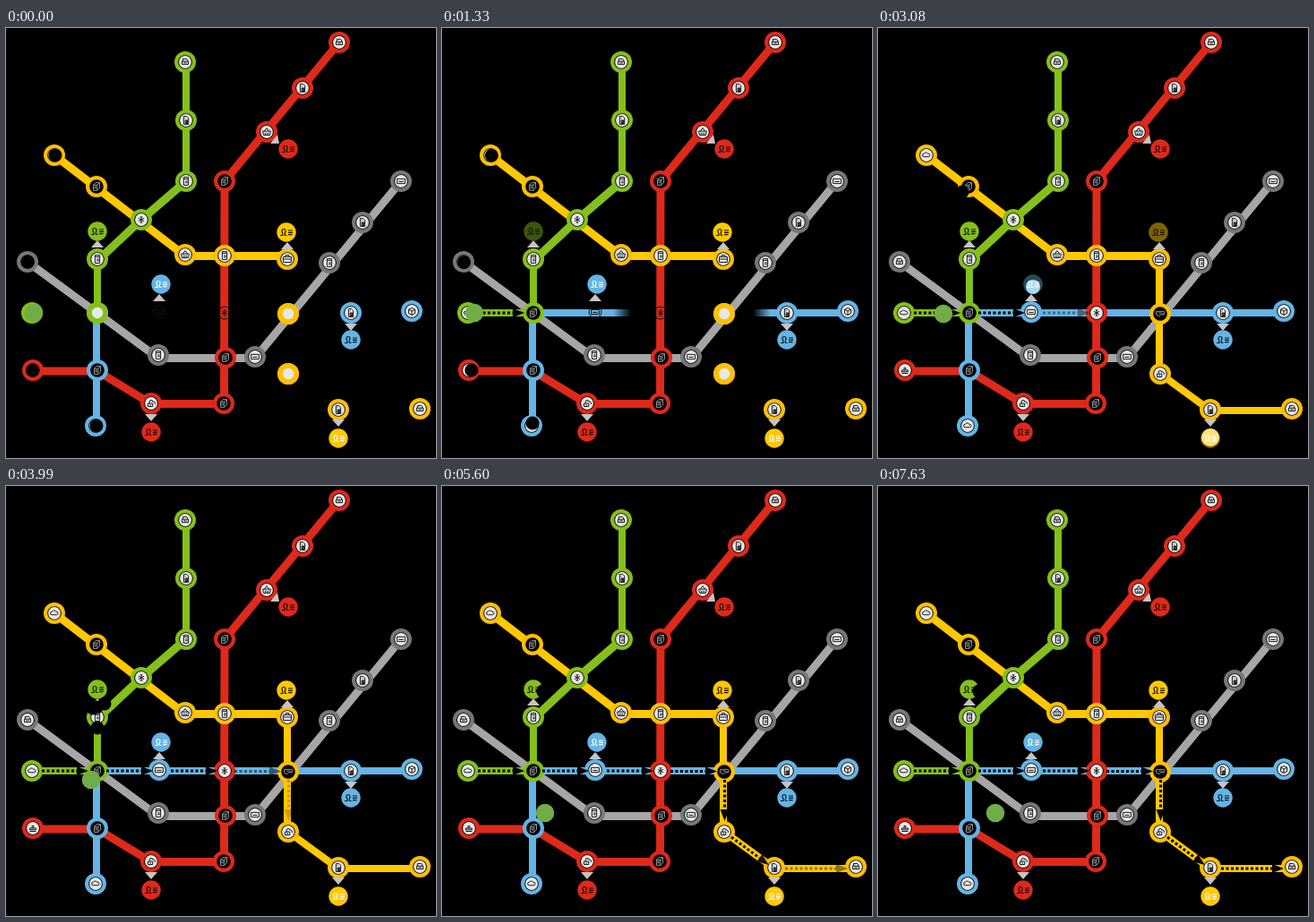
An HTML page that plays this animation: 480 px wide and 480 px high, repeating every 7770 ms.

```html
<!DOCTYPE html>
<html lang="en">
<head>
<meta charset="utf-8">
<title>Network map</title>
<style>
  html, body { margin: 0; width: 100%; height: 100%; overflow: hidden; background: #000; }
  svg { display: block; width: 100vw; height: 100vh; }
</style>
</head>
<body>
<svg id="stage" viewBox="0 0 480 480"></svg>
<script>
const LOOP = 7770, STEP = 70, LAST = 7630;
const GREEN = '#84bf1b', YELLOW = '#ffc800', AMBER = '#ffc000', RED = '#de291b',
      BLUE = '#64b4e6', GREY = '#a6a6a6', STEEL = '#75777a', LIGHT = '#e8e8e8', INK = '#111';

const ICONS = {
  print: 'M-4-1h8v4h-8zM-3-1v-3h5l1 1v2M-2 1h4',
  doc: 'M-3-5h4l2 2v8h-6zM-1 0h3v4h-3zM0 0v4M1 0v4M-1-3v1',
  server: 'M-3-5h6v10h-6zM-3-3h6M-1 0h3M-1 2h3',
  flake: 'M0-4V4M-3.5-2L3.5 2M-3.5 2L3.5-2M-1.5-4L0-3L1.5-4M-1.5 4L0 3L1.5 4',
  basket: 'M-5-1h10l-1 5h-8zM-3-1l3-4 3 4M-2 1v2M0 1v2M2 1v2',
  case: 'M-5-3h10v7h-10zM-2-3v-2h4v2M-5 0h10',
  card: 'M-5-3h10v6h-10zM-3 0.5h6',
  lock: 'M-4 0h6v4h-6zM-2 0v-2a2 2 0 0 1 4 0M2-3l3 2v2M-1 1v2',
  cloud: 'M-3 2a2 2 0 0 1 0-4a3 3 0 0 1 5 0a2 2 0 0 1 1 4z',
  box: 'M-4-2l4-2 4 2v5l-4 2-4-2zM-4-2l4 2 4-2M0 0v5',
  stamp: 'M-4 4h8M-4 2h8v-2h-8zM-1 0v-3h2v3',
  hand: 'M-5-3h10v4h-4l-2 2-4-2zM-2-1h4l2 2',
  stack: 'M-4-2h5v7h-5zM-4-2l3-3h5l-3 3M4-5v7l-3 3M-3 0h3M-3 2h3'
};
const PERSON = 'M-7 3.5h3c1-1-1-3-1-5a2 2 0 0 1 4 0c0 2-2 4 0 5h1.5M2-2h5M2 0.3h5M2 2.6h4.5';

const stage = document.getElementById('stage');
const updates = [];
const clamp = v => Math.max(0, Math.min(1, v));
const progress = (t, start, end) => clamp((t - start) / (end - start));

function add(tag, attrs = {}, parent = stage) {
  const el = document.createElementNS('http://www.w3.org/2000/svg', tag);
  for (const key in attrs) el.setAttribute(key, attrs[key]);
  parent.append(el);
  return el;
}
const group = (x = 0, y = 0, parent = stage) => add('g', { transform: `translate(${x} ${y})` }, parent);
const disc = (r, fill, parent) => add('circle', { r, fill }, parent);
const draw = (d, stroke, width, parent) =>
  add('path', { d, stroke, 'stroke-width': width, fill: 'none', 'stroke-linejoin': 'round' }, parent);
const icon = (name, color, parent) =>
  draw(ICONS[name], color, 1.1, parent).setAttribute('transform', 'scale(0.88)');

function fade(el, start, end, from = 0, to = 1) {
  updates.push(t => el.setAttribute('opacity', from + (to - from) * progress(t, start, end)));
}

// A line revealed from its first end with a soft edge.
function wipe(color, x1, y1, x2, y2, start, end) {
  const id = 'wipe' + updates.length, soft = 0.14;
  const gradient = add('linearGradient', { id, gradientUnits: 'userSpaceOnUse' });
  add('stop', { offset: 0, 'stop-color': color }, gradient);
  add('stop', { offset: 1, 'stop-color': color, 'stop-opacity': 0 }, gradient);
  const line = draw(`M${x1} ${y1}L${x2} ${y2}`, `url(#${id})`, 8);
  updates.push(t => {
    const p = progress(t, start, end), front = p * (1 + soft), back = front - soft;
    gradient.setAttribute('x1', x1 + (x2 - x1) * back);
    gradient.setAttribute('y1', y1 + (y2 - y1) * back);
    gradient.setAttribute('x2', x1 + (x2 - x1) * front);
    gradient.setAttribute('y2', y1 + (y2 - y1) * front);
    line.setAttribute('visibility', p ? 'visible' : 'hidden');
  });
}

function arrow(x, y, length, angle, start, end) {
  const g = add('g', { transform: `translate(${x} ${y}) rotate(${angle})` });
  const shaft = draw(`M0 0H${length - 13}`, '#000', 3, g);
  shaft.setAttribute('stroke-dasharray', '3 2.5');
  add('path', { d: `M${length - 13}-5L${length} 0L${length - 13} 5z` }, g);
  fade(g, start, end);
}

function node(color, x, y, name, dark) {
  const g = group(x, y);
  disc(12, color, g);
  disc(7.8, '#000', g);
  if (!dark) disc(6.9, LIGHT, g);
  icon(name, dark ? '#999' : INK, g);
  return g;
}

function blankNode(color, x, y, start, end) {
  const g = group(x, y);
  disc(12, color, g);
  disc(6.2, LIGHT, g);
  fade(g, start, end, 1, 0);
}

function lateNode(color, x, y, name) {
  const base = group(x, y);
  draw('M-7 0a7 7 0 0 1 14 0a7 7 0 0 1-14 0', INK, 1, base);
  icon(name, INK, base);
  fade(node(color, x, y, name), 1540, 1890);
}

function person(color, x, y, pointer, ink = INK, pulse) {
  add('path', { d: pointer, fill: '#c4c4c4' });
  const g = group(x, y);
  disc(10.7, color, g);
  const mark = draw(PERSON, ink, 1.2, g);
  if (!pulse) return;
  const { start, end, dim, glow, dy = 0, r = 0 } = pulse;
  const shade = disc(10.9, '#000', g);
  const shine = glow && add('circle', { r, cy: dy, fill: glow }, g);
  g.append(mark);
  updates.push(t => {
    const level = Math.sin(Math.PI * progress(t, start, end));
    shade.setAttribute('opacity', level * dim);
    if (shine) shine.setAttribute('opacity', level);
  });
}
const pointUp = (x, y) => `M${x - 7} ${y + 4}L${x} ${y - 4}L${x + 7} ${y + 4}z`;
const pointDown = (x, y) => `M${x - 7} ${y - 4}L${x} ${y + 4}L${x + 7} ${y - 4}z`;

// Smooth position through [time, x, y] keys, at rest at both ends.
function along(keys, t) {
  if (t <= keys[0][0]) return keys[0].slice(1);
  const i = keys.findIndex(k => k[0] > t) - 1;
  if (i < 0) return keys[keys.length - 1].slice(1);
  const span = keys[i + 1][0] - keys[i][0], u = (t - keys[i][0]) / span;
  const slope = (n, axis) => {
    const a = keys[n - 1], b = keys[n + 1];
    return a && b ? (b[axis] - a[axis]) / (b[0] - a[0]) * span : 0;
  };
  return [1, 2].map(axis => {
    const a = keys[i][axis], b = keys[i + 1][axis];
    return a + (b - a) * u * u * (3 - 2 * u)
      + slope(i, axis) * u * (1 - u) * (1 - u) - slope(i + 1, axis) * u * u * (1 - u);
  });
}
function mover(r, fill, keys) {
  const el = disc(r, fill);
  updates.push(t => el.setAttribute('transform', `translate(${along(keys, t).join(' ')})`));
}

// Lines
draw('M24 261L170 368.5H278L441 171', GREY, 9);
draw('M101 318V444', BLUE, 8);
wipe(BLUE, 102, 318, 244, 318, 960, 1510);
wipe(BLUE, 453, 318, 315, 318, 960, 1510);
wipe(BLUE, 244, 318, 315, 318, 1540, 1960);
wipe(GREEN, 29, 318, 102, 318, 490, 980);
draw('M54 142L200 254.5H314', YELLOW, 9);
wipe(YELLOW, 314, 258, 314, 386, 1540, 1820);
wipe(YELLOW, 315, 386, 371, 427, 1750, 2030);
wipe(YELLOW, 371, 427, 462, 427, 1960, 2380);
draw('M201 38V171M102 258V318', GREEN, 8);
draw('M201 171L151 214L102 260', GREEN, 9);
draw('M372 16L244 171L243.5 419.5H162L102 383H30', RED, 9);

// Stations
node(GREEN, 200, 38, 'print');
node(GREEN, 201, 103, 'doc');
node(GREEN, 201, 171, 'server');
node(GREEN, 151, 214, 'flake');
node(GREEN, 102, 258, 'server');
node(GREEN, 102, 318, 'stack', true);
node(GREEN, 29, 318, 'cloud');
node(AMBER, 54, 142, 'cloud');
node(AMBER, 101, 177, 'stack', true);
node(AMBER, 200, 253, 'basket');
node(AMBER, 244, 254, 'server');
node(AMBER, 314, 258, 'case');
node(AMBER, 315, 319, 'hand', true);
node(AMBER, 315, 386, 'lock');
node(AMBER, 371, 426, 'doc');
node(AMBER, 462, 425, 'print');
node(RED, 372, 16, 'print');
node(RED, 331, 67, 'doc');
node(RED, 291, 116, 'basket');
node(RED, 244, 171, 'stack', true);
node(RED, 245, 368, 'stack', true);
node(RED, 243, 419, 'stack', true);
node(RED, 162, 419, 'lock');
node(RED, 30, 382, 'stamp');
node(STEEL, 24, 261, 'print');
node(STEEL, 170, 365, 'server');
node(STEEL, 278, 367, 'card');
node(STEEL, 361, 262, 'server');
node(STEEL, 398, 217, 'doc');
node(STEEL, 441, 171, 'card');
node(BLUE, 385, 318, 'doc');
node(BLUE, 453, 316, 'box');
node(BLUE, 102, 382, 'stack', true);
node(BLUE, 100, 444, 'cloud');
lateNode(BLUE, 171, 317, 'card');
lateNode(RED, 244, 318, 'flake');
blankNode(GREEN, 102, 318, 840, 1120);
blankNode(AMBER, 315, 319, 1750, 2030);
blankNode(AMBER, 315, 386, 1960, 2380);

// Users
person(GREEN, 102, 227, pointUp(102, 241), INK, { start: 980, end: 1680, dim: 0.55 });
person(BLUE, 173, 286, pointUp(171, 301), '#fff',
  { start: 2800, end: 3360, dim: 0.6, glow: '#a9daf5', dy: 3, r: 8 });
person(YELLOW, 313, 228, pointUp(314, 243), INK, { start: 2800, end: 3360, dim: 0.5 });
person(RED, 315, 135, 'M303 119L305 129L295 129z');
person(RED, 162, 451, pointDown(162, 435), INK, { start: 1820, end: 2380, dim: 0.22 });
person(YELLOW, 371, 458, pointDown(371, 441), '#fff',
  { start: 2800, end: 3360, dim: 0.45, glow: '#ffe27a', dy: -1, r: 10 });
person(BLUE, 385, 348, pointDown(385, 334));

// Routes
arrow(40, 318, 52, 0, 840, 1330);
arrow(112, 318, 52, 0, 1750, 2450);
arrow(184, 318, 52, 0, 2800, 3500);
arrow(255, 318.5, 52, 0, 3640, 4340);
arrow(315.5, 328, 46, 90, 3850, 4550);
arrow(323, 392, 52, 36.5, 4900, 5670);
arrow(383, 427, 70, 0, 5390, 5880);

// Packets gather beside the green user.
const goal = [4600, 113, 229];
mover(7.5, '#000', [[0, 55, 142], [1330, 55.4, 142.3], [2100, 59, 148], [3080, 94, 183], [3990, 110, 243], goal]);
mover(7.5, '#000', [[0, 24.3, 261], [1330, 24.6, 261.4], [2100, 28, 265], [3080, 82, 283], [3990, 101, 247], goal]);
mover(7.5, '#000', [[0, 29.5, 382], [700, 30, 382], [1330, 33, 382], [2100, 60, 360], [3080, 75, 335], [3990, 97, 248], goal]);
mover(7.5, '#000', [[0, 101, 444], [700, 101, 444], [1330, 101, 441], [2100, 101, 412], [3080, 122, 355], [3990, 102, 270], goal]);

mover(10.3, '#70ad47', [[0, 31, 318], [1330, 36, 318], [2100, 46, 318], [3080, 73, 319],
  [3990, 95, 328], [5600, 115, 365], [7560, 131, 365]]);

function frame() {
  const t = Math.min(LAST, Math.floor(performance.now() % LOOP / STEP) * STEP);
  for (const update of updates) update(t);
  requestAnimationFrame(frame);
}
frame();
</script>
</body>
</html>
```
